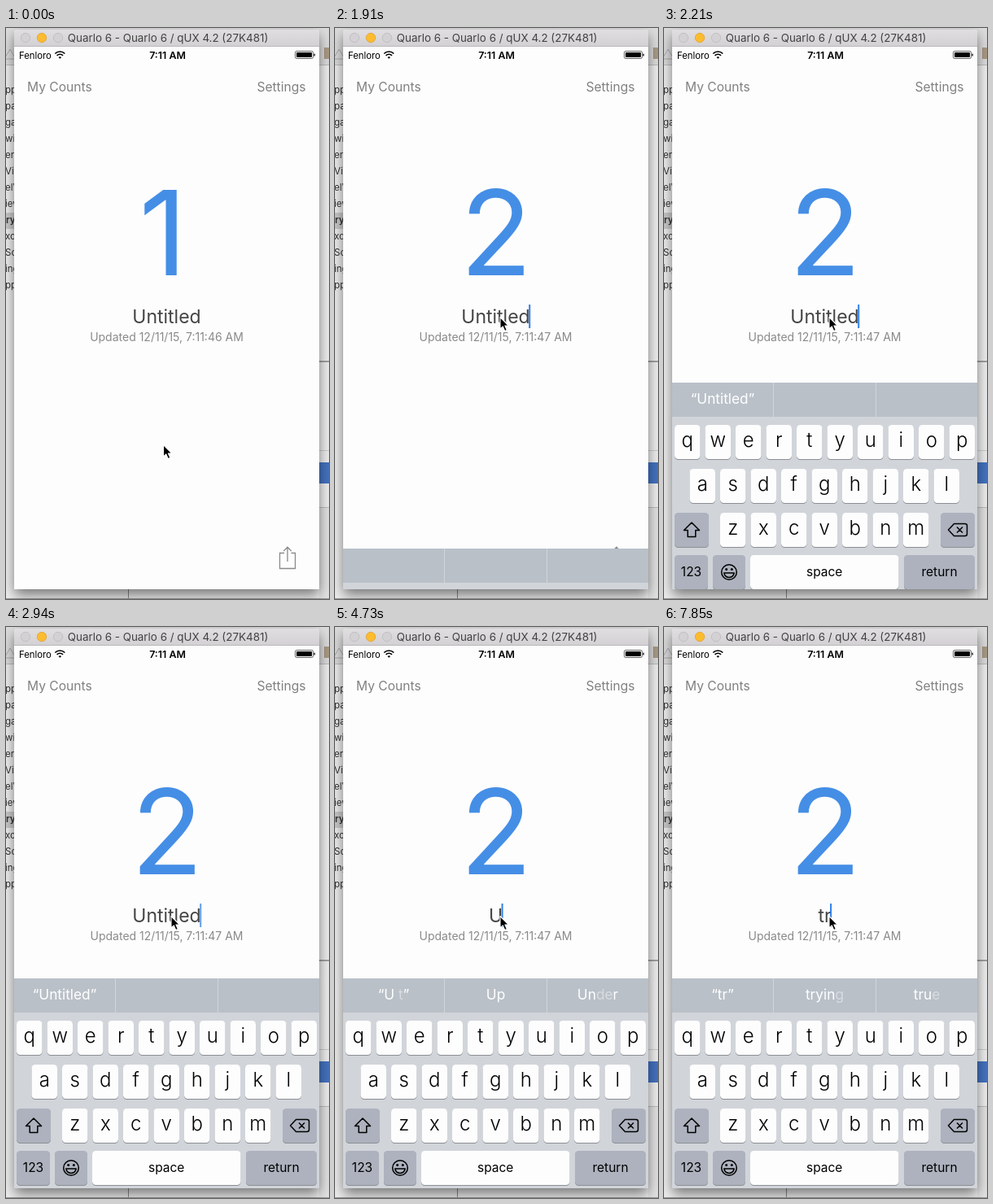
An HTML page that plays this animation: 397 px wide and 702 px high, repeating every 7990 ms.

```html
<!DOCTYPE html>
<html lang="en">
<head>
<meta charset="utf-8">
<title>Counter</title>
<style>
  html, body { margin: 0; width: 100%; height: 100%; overflow: hidden; }
  svg { display: block; width: 397px; height: 702px; font-family: Inter, Roboto, sans-serif; }
  text { white-space: pre; }
  .line { fill: none; stroke: #000; stroke-width: 1.5; stroke-linejoin: round; }
</style>
</head>
<body>
<svg id="stage" viewBox="0 0 397 702"></svg>
<script>
const LOOP = 7990;
const SAMPLE = 145.5;

const text = (x, y, size, fill, content, { anchor = 'middle', weight = 400, id = '' } = {}) =>
  `<text id="${id}" x="${x}" y="${y}" font-size="${size}" fill="${fill}" font-weight="${weight}"
    text-anchor="${anchor}">${content}</text>`;
const rect = (x, y, w, h, fill, extra = '') =>
  `<rect x="${x}" y="${y}" width="${w}" height="${h}" fill="${fill}" ${extra}/>`;
const path = (d, extra = 'class="line"') => `<path d="${d}" ${extra}/>`;

function desktop() {
  const files = ['pp', 'par', 'gat', 'wif', 'erV', 'Vie', 'elV', 'iew', 'ry', 'xca', 'Scr', 'ing', 'ppT'];
  return rect(0, 0, 397, 702, '#eeeeee')
    + rect(0, 0, 397, 45, '#dddcdd')
    + rect(0, 45, 397, 1, '#bcbcbc')
    + rect(0, 227, 10, 20, '#c9c9c9')
    + path('M-2 38L5 26L12 38Z', 'fill="none" stroke="#aaa"')
    + files.map((name, i) => text(i === 8 ? 0 : -1, 80 + i * 20, 11.5, '#333', name,
        { anchor: 'start', weight: i === 8 ? 600 : 400 })).join('')
    + rect(391, 24, 6, 14, '#a99a84')
    + rect(385, 409, 12, 2, '#a0a0a0')
    + rect(385, 519, 12, 1, '#cccccc')
    + rect(385, 534, 12, 26, '#4472c0')
    + rect(385, 589, 12, 113, '#e2e2e2')
    + rect(385, 589, 12, 1, '#bbbbbb')
    + rect(150, 690, 1, 12, '#888888')
    + rect(0, 701, 397, 1, '#999999');
}

function phoneWindow() {
  const lights = ['#d3d1d3', '#fdbc2f', '#d3d1d3'].map((fill, i) =>
    `<circle cx="${24 + i * 20}" cy="12" r="5.7" fill="${fill}" stroke="${i === 1 ? '#e0a030' : '#bdbbbd'}" stroke-width=".8"/>`);
  return rect(10, 2, 375, 688, '#fdfdfd', 'rx="4" filter="url(#shadow)"')
    + path('M10 23V6Q10 2 14 2H381Q385 2 385 6V23Z', 'fill="url(#titlebar)"')
    + rect(10, 22, 375, 1, '#bab8ba')
    + rect(10, 23, 375, 667, '#fdfdfd')
    + lights.join('')
    + text(199, 17, 13.4, '#424142', 'Quarlo 6 - Quarlo 6 / qUX 4.2 (27K481)')
    + text(16, 37.5, 11.3, '#000', 'Fenloro', { anchor: 'start' })
    + path('M60.3 31.5A8.5 8.5 0 0 1 72.3 31.5M62.6 33.8A5.2 5.2 0 0 1 70 33.8',
        'fill="none" stroke="#000" stroke-width="1.7"')
    + path('M64.5 35.9Q66.3 34.4 68.1 35.9L66.3 37.8Z', '')
    + text(198.5, 37.5, 12.4, '#000', '7:11 AM', { weight: 600 })
    + rect(355.5, 28.5, 22, 9, 'none', 'rx="1.8" stroke="#000" stroke-width=".6"')
    + rect(357, 30, 19, 6, '#000', 'rx=".8"')
    + rect(378.5, 31.5, 1.3, 3, '#000', 'rx=".6"')
    + text(26, 78, 15.6, '#808080', 'My Counts', { anchor: 'start' })
    + text(368.5, 78, 15.6, '#808080', 'Settings', { anchor: 'end' })
    + text(198, 304, 145, '#458ee6', '', { id: 'count' })
    + text(197.5, 363, 23, '#454545', '', { id: 'title' })
    + rect(0, 340, 2, 29, '#2f80ea', 'id="caret"')
    + text(197.5, 384.5, 14, '#8a8a8a', '', { id: 'updated' })
    + path('M342 645.5H336.5V664.5H355.5V645.5H350.5M346 656V638.5M341.3 643L346 638.2L350.7 643',
        'fill="none" stroke="#8a8a8a" stroke-width="1.3"');
}

function keyboard() {
  const key = (x, y, w, fill = '#fdfdfd') =>
    rect(x, y + 1, w, 42, '#8b8e93', 'rx="4.5"') + rect(x, y, w, 42, fill, 'rx="4.5"');
  const letters = (row, x, y) => [...row].map((letter, i) =>
    key(x + i * 37.5, y, 31.5) + text(x + i * 37.5 + 15.75, y + 27, 24, '#000', letter, { weight: 350 })).join('');
  const dark = '#adb2be';
  return rect(10, 432, 375, 258, '#d1d5da')
    + rect(10, 432, 375, 42, '#b9c0c8')
    + rect(134, 432, 1, 42, '#d0d5da')
    + rect(260, 432, 1, 42, '#d0d5da')
    + [72, 197.5, 323].map((x, i) => text(x, 458, 17.3, '#fff', '', { id: 'hint' + i })).join('')
    + letters('qwertyuiop', 13, 484)
    + letters('asdfghjkl', 31.5, 538)
    + letters('zxcvbnm', 69, 592)
    + key(13, 592, 42, dark)
    + path('M34 604L43.5 613.5H38.8V621.5H29.2V613.5H24.5Z')
    + key(340, 592, 42, dark)
    + path('M349.5 613L356.5 605.5H370Q372.5 605.5 372.5 608V618Q372.5 620.5 370 620.5H356.5ZM360 609.5L367 616.5M367 609.5L360 616.5')
    + key(13, 644, 41, dark) + text(33.5, 670, 15.5, '#000', '123')
    + key(60, 644, 40, dark)
    + '<circle class="line" cx="80" cy="665" r="9.3"/><circle cx="76.7" cy="661.6" r="1.5"/><circle cx="83.3" cy="661.6" r="1.5"/>'
    + path('M73.8 666H86.2Q85 671.5 80 671.5T73.8 666Z')
    + key(106, 644, 182.5) + text(197.2, 670, 15.5, '#000', 'space')
    + key(295, 644, 87, dark) + text(338.5, 670, 15.5, '#000', 'return');
}

const stage = document.getElementById('stage');
stage.innerHTML = `
  <defs>
    <linearGradient id="titlebar" x2="0" y2="1"><stop stop-color="#e0dee0"/><stop offset="1" stop-color="#d2d0d2"/></linearGradient>
    <filter id="shadow" x="-20%" y="-20%" width="140%" height="140%">
      <feDropShadow dx="0" dy="7" stdDeviation="8" flood-opacity=".5"/>
    </filter>
    <clipPath id="screen"><rect x="10" y="23" width="375" height="667"/></clipPath>
  </defs>
  ${desktop()}${phoneWindow()}
  <g clip-path="url(#screen)"><g id="keyboard">${keyboard()}</g></g>
  <g id="pointer">${path('M0 0V14.5L3.3 11.4L5.7 17L8.3 15.9L5.9 10.5H10.4Z',
    'stroke="#fff" stroke-width="1.1" stroke-linejoin="round"')}</g>`;

const part = id => document.getElementById(id);

// Each entry: start time in ms, then the values that hold from there on.
const titles = [[0, 'Untitled'], [3390, 'Untitle'], [3540, 'Untitl'], [3690, 'Untit'], [3840, 'Unti'],
  [3980, 'Unt'], [4430, 'Un'], [4730, 'U'], [5030, ''], [7260, 't'], [7700, 'tr']];
const carets = [[0, 0], [1910, 1], [2940, .75], [3090, 0], [3390, 1], [5630, .6], [5770, 0],
  [6220, 1], [6670, .6], [6820, 0], [7110, 1]];
// Letters in brackets are still fading.
const hints = [[0, '', '', ''], [2060, '“Untit[d] ”', '[do]         ', ''], [2210, '“Untitled”', '', ''],
  [3540, '“Untitle[d]”', '', ''], [3690, '“Untitle”', '', ''], [4730, '“U [t]”', 'Up', 'Un[de]r'],
  [4880, '“U”', 'Up', 'Under'], [5180, '', '', ''], [7410, '“t”', 'to', 'the'],
  [7850, '“tr”', 'tryin[g]', 'tru[e]']];

const current = (list, t) => list.findLast(([start]) => start <= t).slice(1);
const progress = (t, start, duration) => Math.min(1, Math.max(0, (t - start) / duration));
const easeInOut = p => p * p * (3 - 2 * p);

function render(t) {
  const sampled = 600 + Math.floor((t - 600) / SAMPLE) * SAMPLE;
  const counted = t >= 600;

  part('count').textContent = counted ? 2 : 1;
  part('count').setAttribute('x', counted ? 198 : 193);
  part('updated').textContent = `Updated 12/11/15, 7:11:${counted ? 47 : 46} AM`;

  const title = part('title');
  title.textContent = current(titles, t)[0];
  part('caret').setAttribute('x', 196 + title.getComputedTextLength() / 2);
  part('caret').setAttribute('opacity', current(carets, t)[0]);

  current(hints, t).forEach((hint, i) => {
    part('hint' + i).innerHTML = hint.replace(/\[(.*?)\]/g, '<tspan fill-opacity=".45">$1</tspan>');
  });

  const hidden = Math.round(258 * (1 - progress(sampled, 1880, 423)) ** 3);
  part('keyboard').setAttribute('transform', `translate(0 ${hidden})`);

  const move = easeInOut(progress(sampled, 700, 600));
  part('pointer').setAttribute('transform', `translate(${193.5 + 9.5 * move} ${512.5 - 157 * move})`);
}

function tick() {
  render(performance.now() % LOOP);
  requestAnimationFrame(tick);
}
tick();
</script>
</body>
</html>
```
